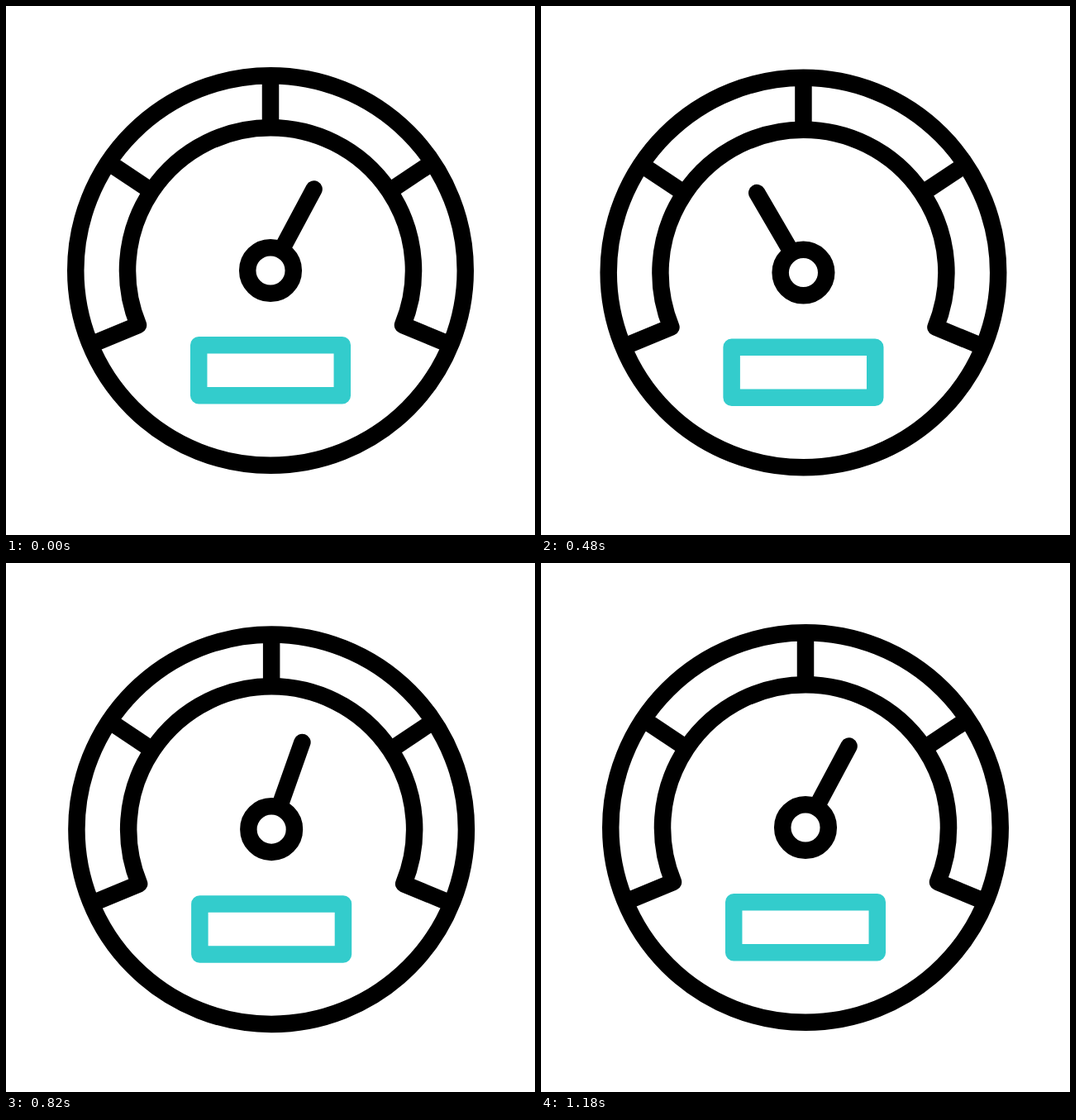
An HTML page for the animation above (1.2 s loop, 640 by 640 pixels).

```html
<!DOCTYPE html>
<html lang="en">
<head>
<meta charset="utf-8">
<title>Speedometer</title>
<style>
  html, body { margin: 0; width: 100%; height: 100%; overflow: hidden; background: #fff; }
  svg { display: block; width: 100%; height: 100%; }
</style>
</head>
<body>
<svg viewBox="0 0 640 640">
  <g id="gauge" fill="none" stroke="#000" stroke-width="20.5" stroke-linejoin="round">
    <circle r="235.75"/>
    <path d="M-218 90L-160 66A173 173 0 1 1 160 66L218 90"/>
    <path id="tick" d="M0-173V-235"/>
    <use href="#tick" transform="rotate(-56.3)"/>
    <use href="#tick" transform="rotate(56.3)"/>
    <circle r="27.8"/>
    <path id="needle" d="M0-28V-111.6" stroke-linecap="round"/>
    <path d="M0-28V-60" id="stem"/>
    <rect x="-86.8" y="90.3" width="173.6" height="61" stroke="#3cc"/>
  </g>
</svg>
<script>
  const LOOP = 1200, STEP = 20, UNIT = 1.28, REST = 28.1;
  const gauge = document.getElementById('gauge');
  const needle = document.getElementById('needle');
  document.getElementById('stem').remove();
  needle.setAttribute('d', 'M0-32V-111.6');

  // [step, degrees away from rest]
  const swing = [[0, 0], [7.5, -10], [15, 0], [30, -90], [43.6, 0], [52, -10], [59, 0]];
  // Shake offsets, four steps apart
  const shake = [
    [0, 0], [4, 0], [-2, -2], [2, 3], [-5, 0], [3, -1], [-2, 2], [1, 0],
    [4, -2], [-4, 0], [2, 2], [-5, 0], [-3, 3], [-3, -1], [-5, 0], [0, 0]
  ].map((p, i) => [Math.min(i * 4, 59), ...p]);

  const ease = u => u * u * (3 - 2 * u);

  function sample(keys, t, col = 1) {
    const i = Math.max(1, keys.findIndex(k => k[0] >= t));
    const a = keys[i - 1], b = keys[i];
    return a[col] + (b[col] - a[col]) * ease((t - a[0]) / (b[0] - a[0]));
  }

  function draw(ms) {
    const t = Math.floor((ms % LOOP) / STEP);
    const x = 320 + UNIT * sample(shake, t, 1);
    const y = 320 + UNIT * sample(shake, t, 2);
    gauge.setAttribute('transform', `translate(${x} ${y})`);
    needle.setAttribute('transform', `rotate(${REST + sample(swing, t)})`);
  }

  let start;
  function tick(now) {
    start ??= now;
    draw(now - start);
    requestAnimationFrame(tick);
  }
  draw(0);
  requestAnimationFrame(tick);
</script>
</body>
</html>
```
